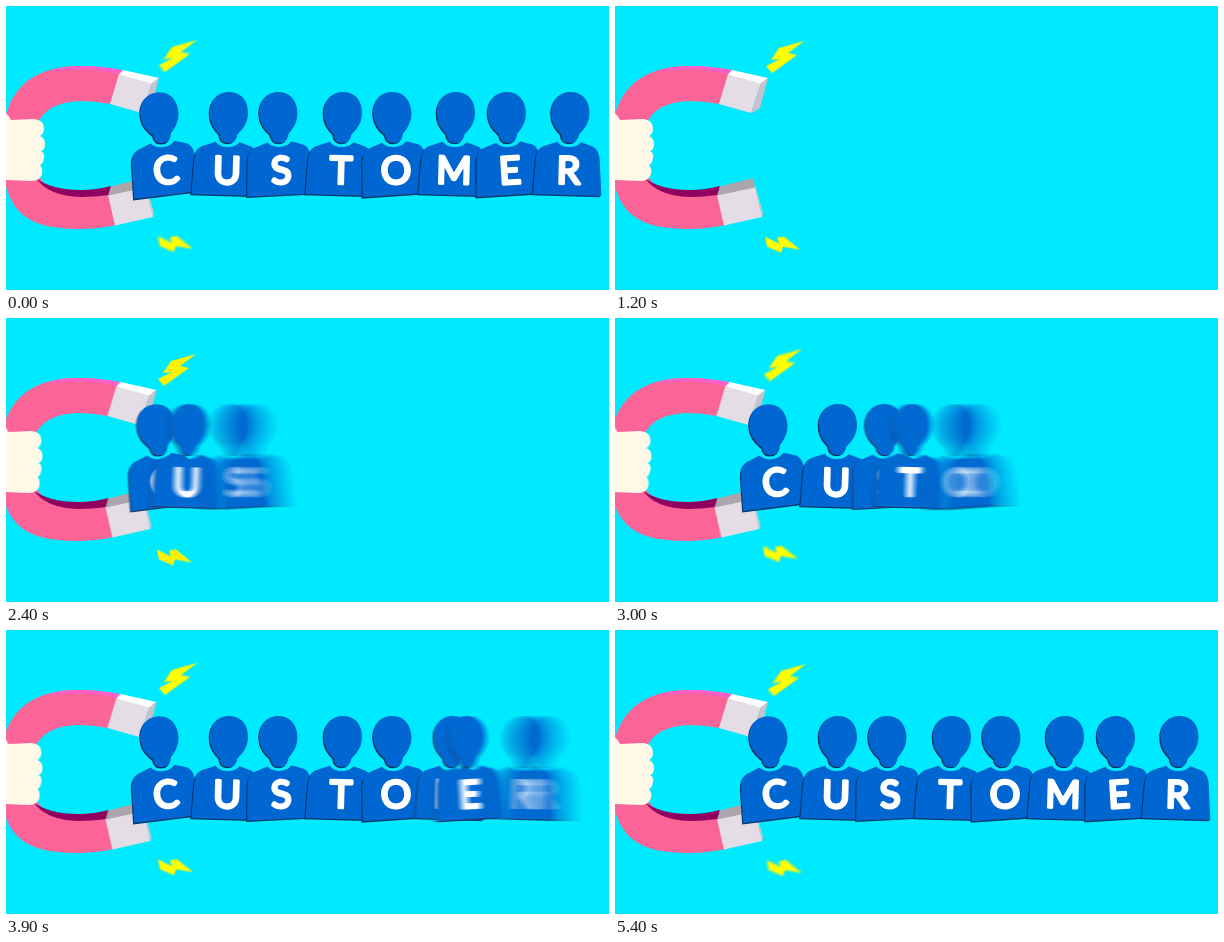
Recreate the animation shown at these times as an HTML page with a canvas. Size 603 by 284 pixels, loop 5500 ms.

```html
<!DOCTYPE html>
<html lang="en">
<head>
<meta charset="utf-8">
<title>Customer magnet</title>
<style>
  html, body { margin: 0; width: 100%; height: 100%; overflow: hidden; background: #00eaff; }
  canvas { display: block; }
</style>
</head>
<body>
<canvas id="stage" width="603" height="284"></canvas>
<script>
const W = 603, H = 284, PAD = 200, LOOP = 5500, STEP = 100;
const SHUTTER = 50, SAMPLES = 15;
const ctx = document.getElementById('stage').getContext('2d');

function makeCanvas(w) {
  const c = document.createElement('canvas');
  c.width = w;
  c.height = H;
  return c;
}

// Sprites are drawn in stage coordinates, with room on both sides.
function sprite(draw) {
  const c = makeCanvas(W + 2 * PAD), g = c.getContext('2d');
  g.translate(PAD, 0);
  draw(g);
  return c;
}

function fill(g, color, d) {
  g.fillStyle = color;
  g.fill(new Path2D(d));
}

// --- Artwork ---

const magnet = sprite(g => {
  const pink = '#fa6496';
  fill(g, pink, 'M116 65 Q95 60 75 60 C26 60 -4 83 -4 142 C-4 205 18 223 75 223 Q92 223 110 219 L104 187 ' +
    'Q90 190 75 190 C45 190 27 176 27 142 C27 108 45 96 75 95 Q90 95 104 98 Z');
  fill(g, '#ff5fca', 'M117 64 Q95 60 75 60 Q55 60 42 66 Q60 63 78 63 Q96 64 114 68 Z');
  fill(g, '#90005f', 'M30 172 Q45 184 75 184 Q90 184 105 180 L103 189 Q88 191 75 191 Q42 190 30 172 Z');

  fill(g, '#e4dde6', 'M113 68 L146 77 L136 107 L104 98 Z');
  fill(g, '#ffffff', 'M117 64 L153 72 L146 77.5 L113 68.5 Z');
  fill(g, '#c6c1ca', 'M153 72 L145 102 L136 107.5 L146 77 Z');

  fill(g, '#e4dde6', 'M102 189 L140 181 L147 211 L109 219.5 Z');
  fill(g, '#aaa6ab', 'M105 180.5 L138 172 L140 181.5 L102 189.5 Z');
  fill(g, '#cbc6cf', 'M138 172 L148 207 L147 211 L140 181 Z');

  fill(g, '#fff8e7', 'M-200 130 L-40 120 L-5 105 Q2 107 5 114 L28 113 Q38 114 38 122 Q38 128 34 130 ' +
    'Q39 132 39 138 Q39 144 35 145 Q39 147 38 152 Q37 158 34 159 Q37 162 36 168 Q34 175 26 175 ' +
    'L0 174 Q-20 172 -40 166 L-200 152 Z');
});

const bolts = [
  'M191 34 L166 41 L158 53 L167 52 L153 59 L159 66 L184 48 L175 46 Z',
  'M187 243 L171 230 L164 231 L166 237 L152 230 L154 240 L168 246 L170 240 Z'
].map(d => sprite(g => fill(g, '#fff200', d)));

const HEAD = 'M1.5 -79 C14.5 -79 20.5 -69 20.5 -58 C20.5 -48 15.5 -42 10.5 -37 Q9.5 -28 1.5 -28 ' +
  'Q-6.5 -28 -7.5 -37 C-12.5 -42 -17.5 -48 -17.5 -58 C-17.5 -69 -11.5 -79 1.5 -79 Z';
const BODY = 'M-34 24 L-32 -11 Q-31 -21 -25 -24 L-11 -29 Q-7 -24 1 -24 Q9 -24 13 -29 L25 -25 ' +
  'Q31 -22 32 -11 L34.5 24 Z';

function person([letter, x, tilt]) {
  return sprite(g => {
    g.translate(x, 165);
    g.rotate(tilt * Math.PI / 180);
    for (const part of [BODY, HEAD]) {
      g.save();
      g.translate(-1.2, 1.3);
      fill(g, '#06376e', part);
      g.restore();
      fill(g, '#0066d2', part);
    }
    g.font = '400 38px Lato, "Open Sans", sans-serif';
    g.textAlign = 'center';
    g.fillStyle = g.strokeStyle = '#fff';
    g.lineWidth = 3;
    g.lineJoin = 'round';
    g.fillText(letter, 1, 12.8);
    g.strokeText(letter, 1, 12.8);
  });
}

const people = [
  ['C', 159, -7], ['U', 220, 1.5], ['S', 274, -3], ['T', 334, 1.5],
  ['O', 389, -4], ['M', 447, 1.5], ['E', 503, -3.5], ['R', 561.5, 1.5]
].map(person);

// --- Motion ---

// Smooth curve through evenly spaced values.
function curve(at, x) {
  const i = Math.floor(x), f = x - i;
  const [a, b, c, d] = [at(i - 1), at(i), at(i + 1), at(i + 2)];
  return b + f / 2 * (c - a + f * (2 * a - 5 * b + 4 * c - d + f * (3 * (b - c) + d - a)));
}
const clamped = list => i => list[Math.max(0, Math.min(list.length - 1, i))];
const cyclic = list => i => list[(i % list.length + list.length) % list.length];

const slide = clamped([-280, -120, 0, 55, 66, 39, 20, 10, 4, 1, 0]);
const pull = clamped([480, 275, 71, -38, -60, -54, -40, -23, -10, -3, -1, 0]);
const shakeX = cyclic([0, 3, 0, -8, -4, -1, 2, 0, -5, -3, -2, -1, -2]);
const shakeY = cyclic([-1, -3, 0, 5, -3, -6, -3, -2, 2, -5, 1, 2, 1]);

const slideAt = t => curve(slide, (t - 200) / 100);

function recoil(t) {
  return t < 1650 || t > 4350 ? 0 : -1.3 * (1 + Math.cos(2 * Math.PI * t / 300));
}

function magnetPose(t) {
  const s = slideAt(t);
  return { x: s + recoil(t), y: 0, turn: Math.max(0, s) * 0.00148 };
}

const boltPose = amount => t => ({
  x: slideAt(t) + curve(shakeX, t / 100),
  y: curve(shakeY, t / 100) * amount,
  turn: 0
});

const personPose = i => t => ({ x: curve(pull, (t - 1500 - 300 * i) / 100), y: 0, turn: 0 });

// --- Rendering ---

const layer = makeCanvas(W), lg = layer.getContext('2d');

function put(g, img, { x, y, turn }) {
  g.save();
  g.translate(x - 10, y + 142);
  g.rotate(turn);
  g.drawImage(img, 10 - PAD, -142);
  g.restore();
}

// Averages poses over the shutter time for motion blur.
function drawMoving(img, pose, t) {
  const a = pose(t - SHUTTER / 2), b = pose(t + SHUTTER / 2);
  if (Math.abs(a.x - b.x) + Math.abs(a.y - b.y) < 0.3) {
    put(ctx, img, pose(t));
    return;
  }
  lg.clearRect(0, 0, W, H);
  lg.globalCompositeOperation = 'lighter';
  lg.globalAlpha = 1 / SAMPLES;
  for (let j = 0; j < SAMPLES; j++) {
    put(lg, img, pose(t + SHUTTER * (j / (SAMPLES - 1) - 0.5)));
  }
  ctx.drawImage(layer, 0, 0);
}

function render(time) {
  const t = time || LOOP - STEP; // the loop opens on its closing pose
  ctx.fillStyle = '#00eaff';
  ctx.fillRect(0, 0, W, H);
  if (t <= 200) return;
  drawMoving(magnet, magnetPose, t);
  drawMoving(bolts[0], boltPose(1), t);
  drawMoving(bolts[1], boltPose(0.7), t);
  people.forEach((img, i) => {
    if (t >= 1500 + 300 * i) drawMoving(img, personPose(i), t);
  });
}

const start = performance.now();
let shown = -1;

function tick() {
  const t = Math.floor((performance.now() - start) % LOOP / STEP) * STEP;
  if (t !== shown) render(shown = t);
  requestAnimationFrame(tick);
}
tick();
</script>
</body>
</html>
```
